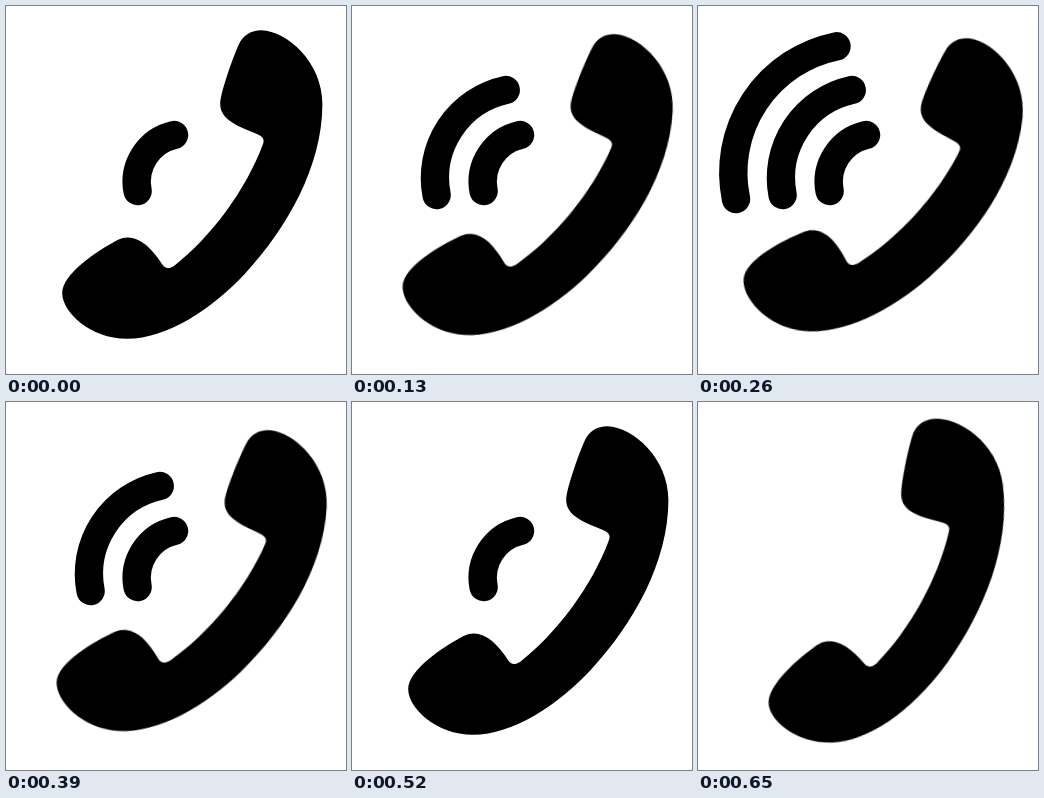
Animation, 340 px wide and 368 px high, one loop 0.78 s. Source, as an HTML page:

```html
<!DOCTYPE html>
<html lang="en">
<head>
<meta charset="utf-8">
<title>Ringing phone</title>
<style>
  html, body { margin: 0; width: 100%; height: 100%; overflow: hidden; background: #fff; }
  svg { display: block; width: 340px; height: 368px; }
  #phone { transform-origin: 187px 181px; }
  .wave { fill: none; stroke: #000; stroke-width: 28.4; stroke-linecap: round; }
</style>
</head>
<body>
<svg viewBox="0 0 340 368">
  <path id="phone" d="M255.5 24.3
    C281 25.3 316.4 56 316.4 98
    C316.4 160 281.2 222 239.6 267
    C206 303 161 332.8 121 332.8
    C84 332.8 56.2 306 56.2 287
    C56.2 268 91 245 111.5 234
    C128 226 143 238 156 258
    C159 263 163 263 168 260
    C205 231 240 184 257 138
    C259 133 256 130 252 128.4
    C231 120 214.2 113.5 214.2 98
    C214.2 88 226 53.5 232.8 38.5
    C236.8 29.5 245 24.3 255.5 24.3Z"/>
  <path class="wave" d="M131.6 185A48 48 0 0 1 168 129"/>
  <path class="wave" d="M84.6 189A90 90 0 0 1 153.7 84"/>
  <path class="wave" d="M38 193A129 129 0 0 1 138.5 40.3"/>
</svg>
<script>
  const STEP = 130;
  // [handset tilt in degrees, visible waves]
  const steps = [[0, 1], [3.1, 2], [6.1, 3], [3.1, 2], [0, 1], [-7.3, 0]];
  const phone = document.getElementById('phone');
  const waves = document.querySelectorAll('.wave');

  function play(el, frame) {
    const frames = [...steps, steps[0]].map((s, i) => ({
      ...frame(s),
      offset: i / steps.length,
      easing: 'steps(1, end)'
    }));
    const anim = el.animate(frames, { duration: STEP * steps.length, iterations: Infinity });
    anim.startTime = document.timeline.currentTime;
  }

  play(phone, ([tilt]) => ({ transform: `rotate(${tilt}deg)` }));
  waves.forEach((wave, i) => play(wave, ([, count]) => ({ opacity: i < count ? 1 : 0 })));
</script>
</body>
</html>
```
